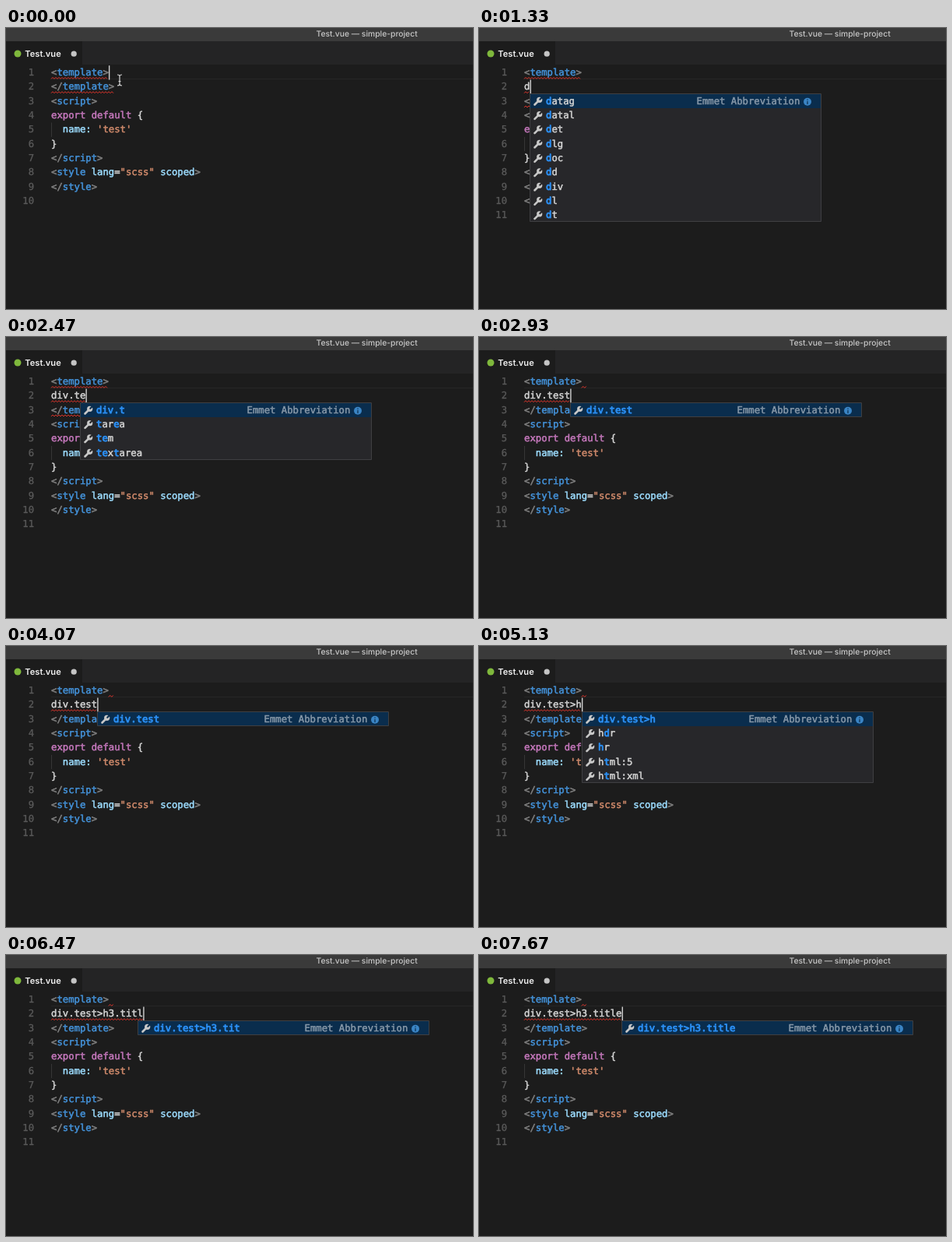
Recreate the animation shown at these times as an HTML page with a canvas. Size 600 by 361 pixels, loop 8000 ms.

```html
<!DOCTYPE html>
<html lang="en">
<head>
<meta charset="utf-8">
<title>Editor abbreviations</title>
<style>
html, body { margin: 0; width: 100%; height: 100%; overflow: hidden; background: #1c1c1c; }
canvas { display: block; width: 600px; height: 361px; }
</style>
</head>
<body>
<canvas id="stage"></canvas>
<script>
const W = 600, H = 361, LOOP = 8000;
const LEFT = 58, CHAR = 7.375, TOP = 48.2, ROW = 18.33, BASE = 12.8;
const POPUP_W = 375, POPUP_LAG = 60, BLINK = 500;
const ENTER = 200, LINT = 2530;
const MONO = '12.25px "DejaVu Sans Mono", monospace';
const C = {
  bg: '#1c1c1c', text: '#d4d4d4', punct: '#808080', tag: '#4493db', attr: '#9cdcfe',
  str: '#d08a6b', key: '#c678bd', num: '#5a5a5a', error: '#e5352b', match: '#2b90f6'
};

const canvas = document.getElementById('stage');
const ctx = canvas.getContext('2d');
const scale = window.devicePixelRatio || 1;
canvas.width = W * scale;
canvas.height = H * scale;

const tag = (open, name) => [[open, 'punct'], [name, 'tag'], ['>', 'punct']];
const OPENING = tag('<', 'template');
const REST = [
  tag('</', 'template'),
  tag('<', 'script'),
  [['export default', 'key'], [' {', 'text']],
  [['  name:', 'attr'], [" 'test'", 'str']],
  [['}', 'text']],
  tag('</', 'script'),
  [['<', 'punct'], ['style', 'tag'], [' lang', 'attr'], ['=', 'text'],
   ['"scss"', 'str'], [' scoped', 'attr'], ['>', 'punct']],
  tag('</', 'style'),
  []
];

const TYPED = 'div.test>h3.title';
const KEYS = [1070, 1470, 1600, 1870, 2330, 2470, 2640, 2730, 4100,
              4860, 5200, 5330, 5670, 6130, 6330, 6470, 6660];

// Square brackets mark the highlighted letters.
const T_LIST = ['[t]ar[e]a', '[te]m', '[te]x[t]area'];
const EXTRA = {
  1: ['[d]atag', '[d]atal', '[d]et', '[d]lg', '[d]oc', '[d]d', '[d]iv', '[d]l', '[d]t'],
  2: ['[di]v'],
  3: ['[div]'],
  4: [],
  5: T_LIST,
  6: T_LIST.slice(1),
  9: [],
  10: ['h[d]r', '[h]r', 'h[t]ml:5', 'h[t]ml:xml'],
  13: T_LIST
};

function suggestions(n) {
  if (!n) return [];
  if (n <= 4 || n === 9) return EXTRA[n];
  return ['[' + TYPED.slice(0, n) + ']', ...(EXTRA[n] || [])];
}

const countKeys = t => KEYS.filter(k => k <= t).length;

function rect(x, y, w, h, color) {
  ctx.fillStyle = color;
  ctx.fillRect(x, y, w, h);
}

function disc(x, y, r, color) {
  ctx.fillStyle = color;
  ctx.beginPath();
  ctx.arc(x, y, r, 0, Math.PI * 2);
  ctx.fill();
}

// Monospaced text on an even grid, thickened by an outline.
function code(text, x, y, color, weight = 0.5) {
  ctx.font = MONO;
  ctx.fillStyle = ctx.strokeStyle = color;
  ctx.lineWidth = weight;
  ctx.lineJoin = 'round';
  [...text].forEach((ch, i) => {
    if (ch === ' ') return;
    ctx.fillText(ch, x + i * CHAR, y);
    ctx.strokeText(ch, x + i * CHAR, y);
  });
}

function label(text, x, y, font, color) {
  ctx.font = font;
  ctx.fillStyle = color;
  ctx.fillText(text, x, y);
}

function squiggle(line, from, to) {
  const y = TOP + line * ROW + 16.2, end = LEFT + to * CHAR;
  ctx.strokeStyle = C.error;
  ctx.lineWidth = 1;
  ctx.beginPath();
  for (let x = LEFT + from * CHAR, up = false; x <= end; x += 2, up = !up) {
    ctx.lineTo(x, y + (up ? -1 : 1));
  }
  ctx.stroke();
}

function drawFrame() {
  rect(0, 0, W, H, C.bg);
  rect(0, 0, W, 17, '#3a3a3a');
  rect(0, 17, W, 30, '#242425');
  rect(0, 17, 98, 30, C.bg);
  label('Test.vue — simple-project', 398.5, 11.2, '500 10.35px Inter, sans-serif', '#c8c8c8');
  label('Test.vue', 24.3, 37.3, '600 11.1px Inter, sans-serif', '#f0f0f0');
  disc(15, 33, 4.5, '#7fb83c');
  disc(87.2, 33.2, 3.6, '#c5c5c5');
}

function drawLine(tokens, index) {
  const y = TOP + index * ROW + BASE, num = String(index + 1);
  code(num, 36 - num.length * CHAR, y, C.num, 0.3);
  let col = 0;
  for (const [text, color] of tokens) {
    code(text, LEFT + col * CHAR, y, C[color]);
    col += text.length;
  }
}

function drawMouse() {
  ctx.strokeStyle = '#d8d8d8';
  ctx.lineWidth = 1.2;
  ctx.beginPath();
  ctx.moveTo(146, 61.5);
  ctx.lineTo(146, 72.5);
  for (const [y, d] of [[60, 1.5], [74, -1.5]]) {
    ctx.moveTo(143, y);
    ctx.quadraticCurveTo(145.5, y, 146, y + d);
    ctx.quadraticCurveTo(146.5, y, 149, y);
  }
  ctx.moveTo(144.5, 68.5);
  ctx.lineTo(147.5, 68.5);
  ctx.stroke();
}

function drawWrench(x, y, hole) {
  ctx.strokeStyle = '#c8c8c8';
  ctx.lineWidth = 2.6;
  ctx.lineCap = 'round';
  ctx.beginPath();
  ctx.moveTo(x - 4, y + 4);
  ctx.lineTo(x + 1, y - 1);
  ctx.stroke();
  disc(x + 2.2, y - 2.2, 3.6, '#c8c8c8');
  ctx.strokeStyle = hole;
  ctx.lineWidth = 2.2;
  ctx.beginPath();
  ctx.moveTo(x + 2.8, y - 2.8);
  ctx.lineTo(x + 6, y - 6);
  ctx.stroke();
  ctx.lineCap = 'butt';
}

function drawPopup(n) {
  const items = suggestions(n);
  if (!items.length) return;
  const x = Math.round(LEFT + n * CHAR), y = 85;
  const h = Math.floor(items.length * ROW);
  const fill = '#27272a', active = '#0a2d4d';
  rect(x, y, POPUP_W, h, fill);
  rect(x, y, POPUP_W, 18, active);
  ctx.strokeStyle = '#3f3f42';
  ctx.lineWidth = 1;
  ctx.strokeRect(x + 0.5, y - 0.5, POPUP_W - 1, h);

  items.forEach((item, i) => {
    const top = y + i * ROW;
    drawWrench(x + 10.5, top + 9.5, i ? fill : active);
    let col = 0, hit = false;
    for (const ch of item) {
      if (ch === '[' || ch === ']') {
        hit = ch === '[';
        continue;
      }
      code(ch, x + 21 + col++ * CHAR, top + BASE, hit ? C.match : C.text, hit ? 0.85 : 0.5);
    }
  });

  code('Emmet Abbreviation', x + 214.5, y + BASE, '#8798a8');
  disc(x + 357, y + 9.8, 5, '#3a84c4');
  rect(x + 356.4, y + 9, 1.2, 4, active);
  rect(x + 356.4, y + 6.6, 1.2, 1.3, active);
}

function draw(t) {
  ctx.setTransform(scale, 0, 0, scale, 0, 0);
  ctx.textRendering = 'geometricPrecision';
  const entered = t >= ENTER, n = countKeys(t);
  const typed = TYPED.slice(0, n);
  const lines = [OPENING, ...(entered ? [[[typed, 'text']]] : []), ...REST];
  const caretLine = entered ? 1 : 0, caretCol = entered ? n : 10;
  const caretTop = TOP + caretLine * ROW;

  drawFrame();
  rect(LEFT, 65, W, 1, '#262626');
  rect(LEFT, TOP + (entered ? 5 : 4) * ROW, 1, ROW, '#363636');
  lines.forEach(drawLine);

  if (t < LINT) {
    squiggle(0, 0, 10);
    squiggle(entered ? 2 : 1, 0, 11);
  } else {
    squiggle(0, 10, 10.9);
  }
  if (n) squiggle(1, 0, n);

  const last = n ? KEYS[n - 1] : entered ? ENTER : 0;
  if (Math.floor((t - last) / BLINK) % 2 === 0) {
    rect(LEFT + caretCol * CHAR + 0.2, caretTop, 1.4, ROW, '#d0d0d0');
  }
  if (!entered) drawMouse();
  drawPopup(countKeys(t - POPUP_LAG));
}

let start;
function tick(now) {
  start ??= now;
  draw((now - start) % LOOP);
  requestAnimationFrame(tick);
}
draw(0);
requestAnimationFrame(tick);
</script>
</body>
</html>
```
